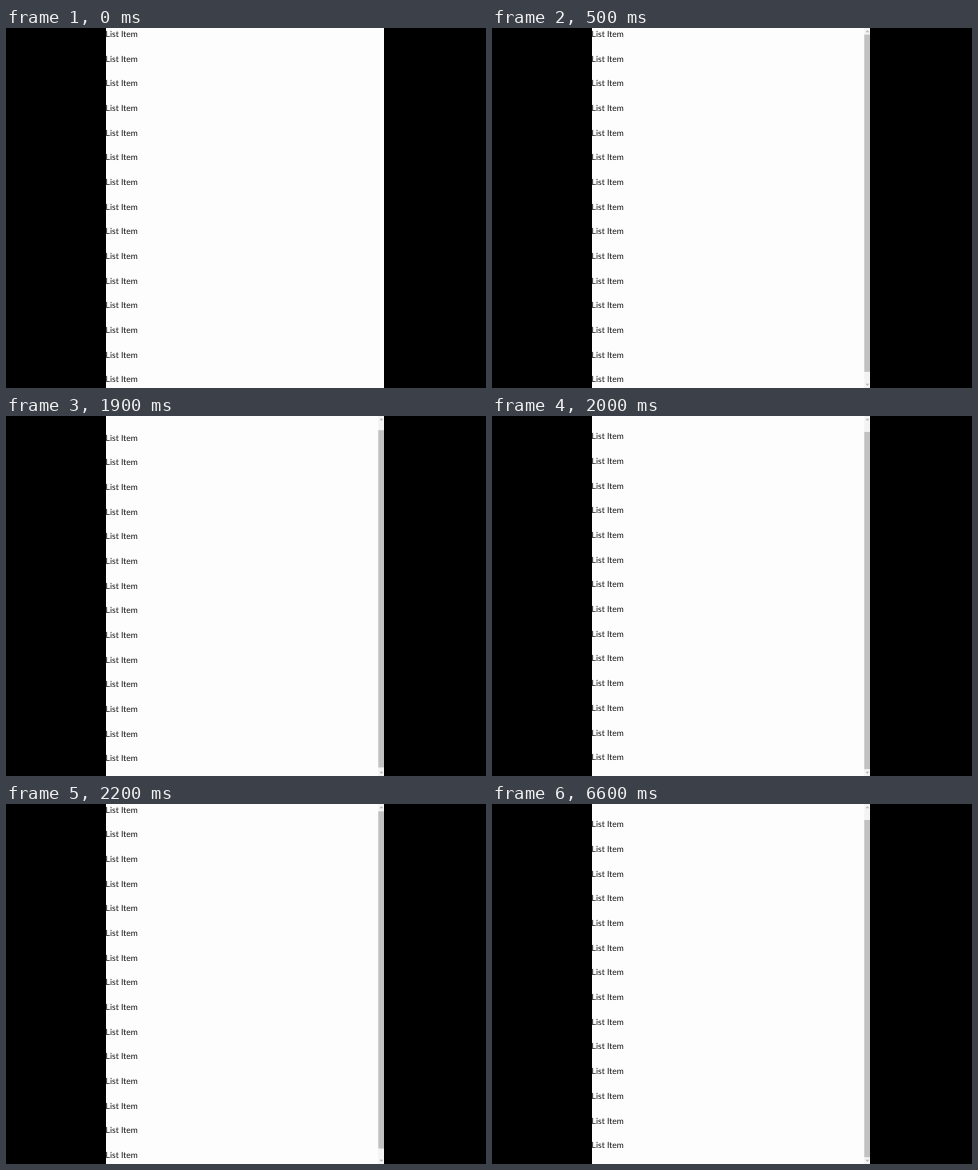
An HTML page that plays this animation: 480 by 360 pixels, repeating every 8.1 s.

```html
<!DOCTYPE html>
<html lang="en">
<head>
<meta charset="utf-8">
<title>Scrolling list</title>
<style>
  html, body { margin: 0; width: 100%; height: 100%; overflow: hidden; background: #000; }
  svg { display: block; }
  text { font: 8.5px Lato, "Open Sans", sans-serif; fill: #111; text-rendering: geometricPrecision; }
</style>
</head>
<body>
<svg width="480" height="360" viewBox="0 0 480 360">
  <rect x="100" width="278" height="360" fill="#fdfdfd"/>
  <g id="list"></g>
  <g id="bar">
    <rect x="372.3" width="5.7" height="360" fill="#f3f3f3"/>
    <path d="M373.6 4.2L375.4 2.2L377.2 4.2ZM373.6 355.8L375.4 357.8L377.2 355.8Z" fill="#b0b0b0"/>
    <rect id="thumb" x="372.3" y="6.6" width="5.7" height="337.2" fill="#c1c1c1"/>
  </g>
</svg>
<script>
const LOOP = 8100, STEP = 100, PITCH = 24.68, ROWS = 15;
const MAX_SCROLL = 10.2, THUMB_RATIO = 0.92, THUMB_LAG = 30;
const [list, bar, thumb] = ['list', 'bar', 'thumb'].map(id => document.getElementById(id));

for (let i = 0; i < ROWS; i++) {
  const row = document.createElementNS('http://www.w3.org/2000/svg', 'text');
  row.setAttribute('x', 99.6);
  row.setAttribute('y', 8.9 + i * PITCH);
  row.textContent = 'List Item';
  list.append(row);
}

const progress = (t, from, to) => Math.min(1, Math.max(0, (t - from) / (to - from)));
const easeOut = (p, power) => 1 - (1 - p) ** power;
const shiftY = (el, y) => el.setAttribute('transform', `translate(0 ${y})`);

// Scrolls down, springs back, then later jumps to the end.
function scrollAt(t, lag = 0) {
  if (t >= 6600) return MAX_SCROLL;
  const down = easeOut(progress(t - lag, 1700, 2000), 2);
  const back = easeOut(progress(t - lag, 2000, 2300), 3);
  return MAX_SCROLL * (down - back);
}

const start = performance.now();

function draw() {
  const elapsed = (performance.now() - start) % LOOP;
  const t = Math.floor(elapsed / STEP) * STEP;
  shiftY(list, -scrollAt(t));
  shiftY(thumb, scrollAt(t, THUMB_LAG) * THUMB_RATIO);
  bar.setAttribute('opacity', progress(t, 300, 500));
  requestAnimationFrame(draw);
}
draw();
</script>
</body>
</html>
```
